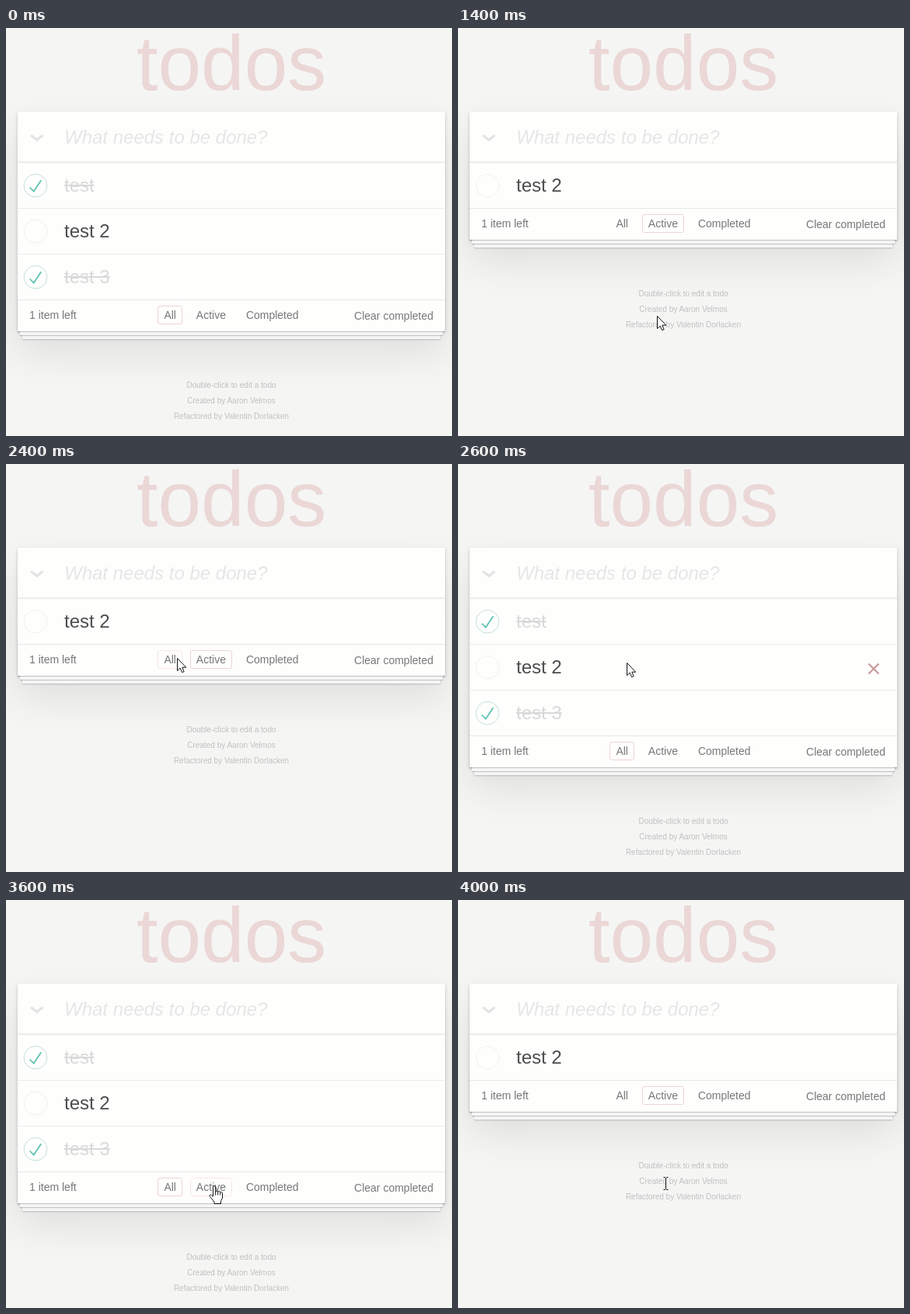
An HTML page that plays this animation: 574x526 px, repeating every 4200 ms.

```html
<!DOCTYPE html>
<html lang="en">
<head>
<meta charset="utf-8">
<title>todos</title>
<style>
  html, body { margin: 0; width: 100%; height: 100%; overflow: hidden; background: #f5f5f4; }
  body { position: relative; font: 14px "Liberation Sans", Arial, sans-serif; color: #777; -webkit-font-smoothing: antialiased; }
  h1, p, ul { margin: 0; padding: 0; list-style: none; }
  h1 { position: absolute; left: 15px; top: -11px; width: 550px; text-align: center;
       font-size: 100px; font-weight: 400; line-height: 112px; color: rgba(175, 47, 47, .15); }

  .app { position: absolute; left: 15px; top: 108px; width: 550px; }
  .card { position: relative; background: #fefefd;
          box-shadow: 0 2px 4px rgba(0, 0, 0, .2), 0 25px 50px rgba(0, 0, 0, .1); }
  .new { position: relative; box-sizing: border-box; height: 65px; padding-left: 60px;
         font-size: 24px; font-style: italic; line-height: 66px; color: #e6e6e6;
         box-shadow: inset 0 -2px 1px rgba(0, 0, 0, .03); }
  .new svg { position: absolute; left: 0; top: 0; }

  .list { border-top: 1px solid #e6e6e6; }
  .list li { position: relative; height: 58px; padding-left: 60px; border-bottom: 1px solid #ededed;
             font-size: 24px; line-height: 58px; color: #4d4d4d; }
  .list li:last-child, .active .list li { border-bottom: 0; }
  .list .done { color: #d9d9d9; text-decoration: line-through; }
  .active .done { display: none; }
  .toggle { position: absolute; left: 0; top: 9px; fill: none; stroke: #ededed; stroke-width: 3; }
  .toggle path { display: none; fill: #5dc2af; stroke: none; }
  .done .toggle { stroke: #bddad5; }
  .done .toggle path { display: block; }
  .destroy { position: absolute; left: 512px; top: 22px; visibility: hidden; }
  .hover .destroy { visibility: visible; }

  .bar { position: relative; height: 40px; border-top: 1px solid #e6e6e6; }
  .bar::before { content: ""; position: absolute; left: 0; right: 0; bottom: 0; height: 50px;
    box-shadow: 0 1px 1px rgba(0, 0, 0, .2), 0 8px 0 -3px #f6f6f6, 0 9px 1px -3px rgba(0, 0, 0, .2),
                0 16px 0 -6px #f6f6f6, 0 17px 2px -6px rgba(0, 0, 0, .2); }
  .count { position: absolute; left: 15px; line-height: 38px; }
  .clear { position: absolute; right: 15px; line-height: 40px; }
  .filters { position: absolute; top: 7px; width: 100%; text-align: center; line-height: 16px; }
  .filters span { display: inline-block; margin: 0 3px; padding: 3px 7px; border: 1px solid transparent; border-radius: 3px; }
  .filters .hover { border-color: rgba(175, 47, 47, .1); }
  .filters .selected { border-color: rgba(175, 47, 47, .2); }

  .info { margin-top: 65px; text-align: center; font-size: 10px; line-height: 10px;
          color: #bfbfbf; text-shadow: 0 1px 0 rgba(255, 255, 255, .5); }
  .info p { margin-bottom: 10px; }
  .cursors { position: absolute; left: 0; top: 0; fill: #fff; stroke: #111; stroke-linejoin: round; }
</style>
</head>
<body>
<h1>todos</h1>
<div class="app" id="app">
  <div class="card">
    <div class="new">What needs to be done?
      <svg width="50" height="65"><path d="M17 30.2L24.7 36.4L32.4 30.2" fill="none" stroke="#e4e4e4" stroke-width="3.4"/></svg>
    </div>
    <ul class="list" id="list"></ul>
    <div class="bar">
      <span class="count">1 item left</span>
      <div class="filters">
        <span id="all">All</span>
        <span id="active">Active</span>
        <span id="completed">Completed</span>
      </div>
      <span class="clear">Clear completed</span>
    </div>
  </div>
  <div class="info">
    <p>Double-click to edit a todo</p>
    <p>Created by Aaron Velmos</p>
    <p>Refactored by Valentin Dorlacken</p>
  </div>
</div>
<svg class="cursors" width="574" height="526">
  <path id="arrow" d="M.5 .5V16.6L4.2 13.2L6.6 18.7L9.1 17.6L6.8 12.2H11.8Z"/>
  <path id="hand" d="M5.5 14V2.4a1.6 1.6 0 0 1 3.2 0V8.5a1.5 1.5 0 0 1 3 .2a1.5 1.5 0 0 1 3 .6a1.5 1.5 0 0 1 2.8 .8V16l-2 4.5V23.5H7V21L1.5 14.5c-1.5-2 .8-3.2 2-2ZM8.7 8.5v4M11.7 8.7v3.8M14.7 9.3v3.2"/>
  <path id="beam" fill="none" d="M.5 .5h2l1 1l1-1h2M3.5 1.5v14M.5 16.5h2l1-1l1 1h2"/>
</svg>
<script>
const LOOP = 4200;
const byId = id => document.getElementById(id);

// start time, filter, cursor, left, top, hovered element
const steps = [
  [0, 'all'],
  [200, 'all', 'arrow', 283, 427],
  [400, 'all', 'arrow', 273, 383],
  [600, 'all', 'hand', 268, 372, 'active'],
  [1400, 'active', 'arrow', 256, 371],
  [1600, 'active', 'arrow', 226, 363],
  [1800, 'active', 'arrow', 224, 281],
  [2000, 'active', 'hand', 215, 250, 'all'],
  [2400, 'active', 'arrow', 220, 250, 'all'],
  [2600, 'all', 'arrow', 217, 256, 'row2'],
  [2800, 'all', 'arrow', 221, 262, 'row2'],
  [3000, 'all', 'arrow', 234, 282, 'row2'],
  [3200, 'all', 'arrow', 254, 328, 'row3'],
  [3400, 'all', 'hand', 261, 367, 'active'],
  [3600, 'all', 'hand', 261, 368, 'active'],
  [3800, 'active', 'hand', 261, 363],
  [4000, 'active', 'beam', 264, 357],
];

const row = (text, n, done) => `<li id="row${n}" class="${done ? 'done' : ''}">${text}
  <svg class="toggle" width="40" height="40" viewBox="-10 -18 100 135" overflow="visible">
    <circle cx="50" cy="50" r="50"/><path d="M72 25L42 71 27 56l-4 4 20 20 34-52z"/></svg>
  <svg class="destroy" width="16" height="18"><path d="M1.5 2.5L14.5 15.5M14.5 2.5L1.5 15.5" stroke="#cc9a9a" stroke-width="2.3"/></svg></li>`;
byId('list').innerHTML = row('test', 1, true) + row('test 2', 2, false) + row('test 3', 3, true);

const hoverable = ['all', 'active', 'completed', 'row1', 'row2', 'row3'].map(byId);
const cursors = ['arrow', 'hand', 'beam'].map(byId);
let shown;

function render(time) {
  const step = steps.findLast(s => s[0] <= time);
  if (step === shown) return;
  shown = step;
  const [, filter, cursor, x, y, hover] = step;
  byId('app').classList.toggle('active', filter === 'active');
  for (const el of hoverable) {
    el.classList.toggle('selected', el.id === filter);
    el.classList.toggle('hover', el.id === hover);
  }
  for (const el of cursors) {
    el.style.display = el.id === cursor ? '' : 'none';
    if (el.id === cursor) el.setAttribute('transform', `translate(${x} ${y})`);
  }
}

const start = performance.now();
function tick() {
  render((performance.now() - start) % LOOP);
  requestAnimationFrame(tick);
}
tick();
</script>
</body>
</html>
```
